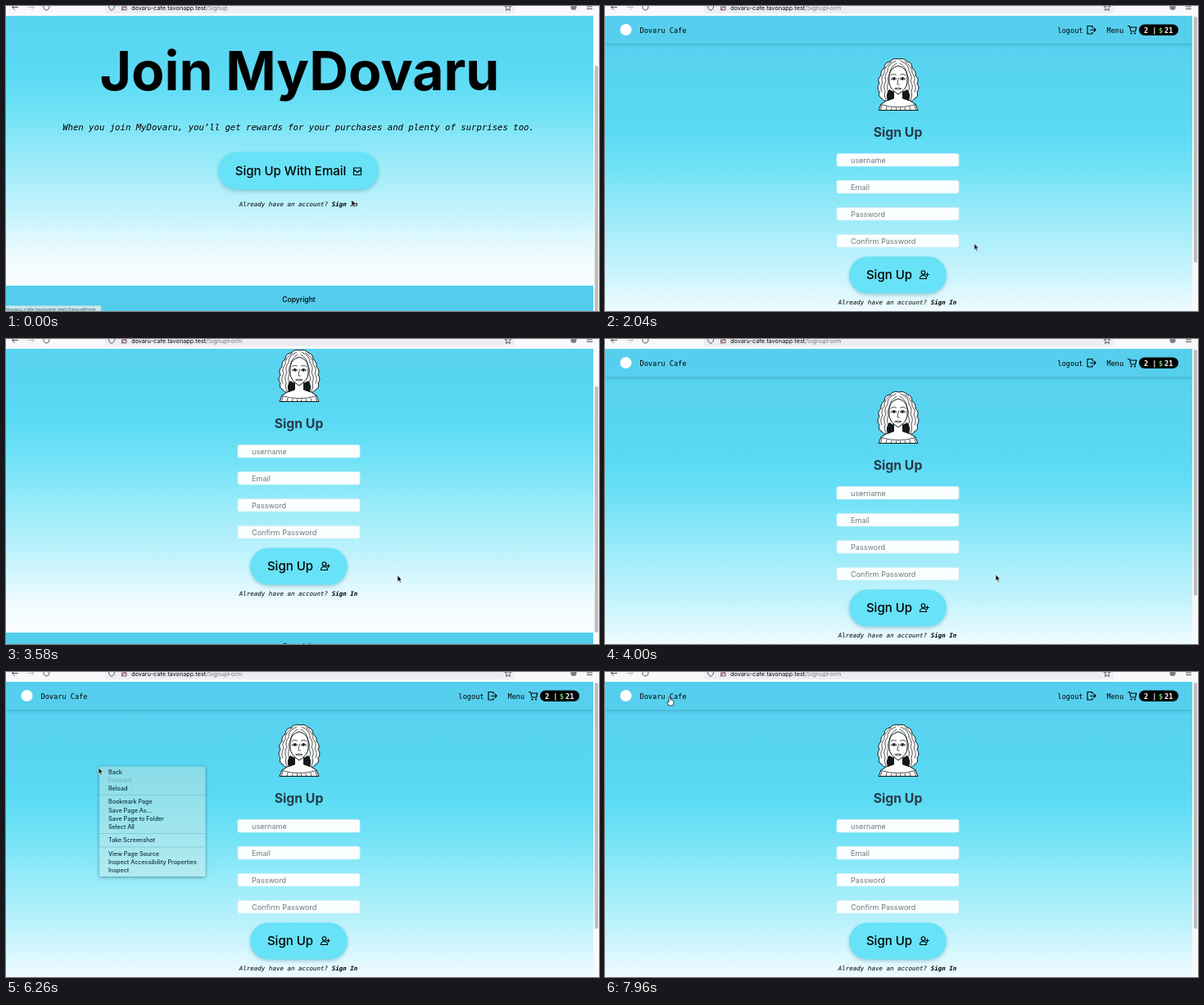
Animation, 724 px wide and 373 px high, one loop 8 s. Source, as an HTML page:

```html
<!DOCTYPE html>
<html lang="en">
<head>
<meta charset="utf-8">
<title>Sign up</title>
<style>
  html, body { margin: 0; width: 100%; height: 100%; overflow: hidden; background: #fff; }
  svg.stage { display: block; width: 724px; height: 373px; }
  text { font-family: Inter, Roboto, sans-serif; fill: #000; }
  .mono { font-family: "DejaVu Sans Mono", "Liberation Mono", monospace; font-size: 8.6px; }
  .note { font-size: 7.5px; font-style: italic; }
  .lead { font-size: 10.63px; font-style: italic; }
  .mid { text-anchor: middle; }
  .bold { font-weight: 700; }
  .title { font-size: 66px; font-weight: 750; }
  .heading { font-size: 15.8px; fill: #263c48; }
  .label { font-size: 15px; font-weight: 450; }
  .hint { font-size: 9.1px; fill: #74797d; }
  .url { font-size: 7.3px; }
  .path { fill: #77777d; }
  .menu text { font-size: 7.15px; font-weight: 500; fill: #0d3440; }
  .menu .off { fill: #6fb4c1; }
  .pill text { fill: #fff; }
  .pill .money { fill: #5fd35a; }
  .field { fill: #fafeff; stroke: #d3f0f7; stroke-width: .8; }
  .btn { fill: #68e2f7; filter: drop-shadow(0 2px 2px rgba(20, 100, 120, .3)); }
  .bar { fill: #56cfee; filter: drop-shadow(0 2px 2px rgba(20, 90, 110, .25)); }
  .panel { fill: url(#glass); filter: drop-shadow(0 1px 2px rgba(10, 60, 75, .5)); }
  .icon { fill: none; stroke: #000; stroke-width: 1.1; stroke-linecap: round; stroke-linejoin: round; }
  .chrome { fill: none; stroke: #55555c; stroke-width: 1; stroke-linecap: round; stroke-linejoin: round; }
  .chrome.off { stroke: #b9b9be; }
  .ink { fill: none; stroke: #14181a; stroke-width: .75; stroke-linecap: round; }
  .paper { fill: #fff; stroke: #14181a; stroke-width: 1; stroke-linejoin: round; }

  .page, .thumb, .cursor, .before, .after, .menu, .arrow, .hand {
    animation: 8s step-end infinite;
  }
  .page { animation-name: scroll; }
  .thumb { animation-name: thumb; }
  .cursor { animation-name: move; }
  .before { animation-name: before; }
  .after { animation-name: after; }
  .menu { animation-name: menu; }
  .arrow { animation-name: arrow; }
  .hand { animation-name: hand; }

  @keyframes scroll {
    0% { transform: translateY(-68px); }
    18.75% { transform: translateY(-46px); }
    20.4% { transform: translateY(-16px); }
    22.1% { transform: translateY(0); }
    43.25% { transform: translateY(-20px); }
    44.75% { transform: translateY(-51px); }
    46.25% { transform: translateY(-68px); }
    48% { transform: translateY(-30px); }
    50%, 100% { transform: translateY(0); }
  }
  @keyframes thumb {
    0% { transform: translateY(60px); }
    18.75% { transform: translateY(40px); }
    20.4% { transform: translateY(14px); }
    22.1% { transform: translateY(0); }
    43.25% { transform: translateY(17px); }
    44.75% { transform: translateY(45px); }
    46.25% { transform: translateY(60px); }
    48% { transform: translateY(26px); }
    50%, 100% { transform: translateY(0); }
  }
  @keyframes move {
    0% { transform: translate(422px, 237px); }
    3.5% { transform: translate(422px, 237px); animation-timing-function: steps(8); }
    16.8% { transform: translate(445px, 294px); }
    20.4% { transform: translate(445px, 294px); animation-timing-function: steps(8); }
    34.6% { transform: translate(468px, 280px); animation-timing-function: steps(6); }
    44.7% { transform: translate(478px, 289px); }
    50% { transform: translate(477px, 288px); }
    56.8% { transform: translate(477px, 288px); animation-timing-function: steps(8); }
    70% { transform: translate(113px, 117px); }
    85.2% { transform: translate(113px, 117px); animation-timing-function: steps(6); }
    96% { transform: translate(74px, 32px); }
    97.6%, 100% { transform: translate(79px, 30px); }
  }
  @keyframes before { 0% { visibility: visible; } 3.5%, 100% { visibility: hidden; } }
  @keyframes after { 0% { visibility: hidden; } 3.5%, 100% { visibility: visible; } }
  @keyframes menu { 0% { visibility: hidden; } 76.5% { visibility: visible; } 83.5%, 100% { visibility: hidden; } }
  @keyframes arrow { 0% { visibility: visible; } 97.6%, 100% { visibility: hidden; } }
  @keyframes hand { 0% { visibility: hidden; } 97.6%, 100% { visibility: visible; } }
</style>
</head>
<body>
<svg class="stage" viewBox="0 0 724 373">
  <defs>
    <linearGradient id="sky" gradientUnits="userSpaceOnUse" x1="0" y1="12" x2="0" y2="410">
      <stop offset="0" stop-color="#56cfee"/>
      <stop offset=".22" stop-color="#58d5f1"/>
      <stop offset=".35" stop-color="#5bdaf4"/>
      <stop offset=".45" stop-color="#6ce1f6"/>
      <stop offset=".6" stop-color="#96eaf9"/>
      <stop offset=".75" stop-color="#bdf2fc"/>
      <stop offset=".91" stop-color="#effbff"/>
      <stop offset="1" stop-color="#fbfdff"/>
    </linearGradient>
    <linearGradient id="glass" x1="0" y1="0" x2="0" y2="1">
      <stop offset="0" stop-color="#8adbe8"/>
      <stop offset=".4" stop-color="#98e2ec"/>
      <stop offset="1" stop-color="#b4ebf2"/>
    </linearGradient>
    <g id="half">
      <path d="M15 38Q10 44 13 52L20 49L20.500 41Z" fill="#14181a"/>
      <path class="ink" d="M23 3Q12 8 13 16Q8 22 11 28Q7 34 10 40Q8 46 11 51M18 4Q8 11 9 18Q4 24 7 29Q3 36 6 41M24 6Q16 11 16 18Q12 24 14 30Q11 36 14 41"/>
      <path class="ink" d="M17 20.500Q20 17.800 23.500 20" stroke-width="1.200"/>
      <path class="ink" d="M17.500 25.200Q20.500 21.500 24 25.200Q20.800 27.600 17.500 25.200"/>
      <circle cx="20.800" cy="24.700" r="1.500" fill="#14181a"/>
      <path class="ink" d="M6 58L4.500 63M12 59.500L11 63M18 60.500L17.500 63M23.500 61V63"/>
    </g>
  </defs>

  <g class="page">
    <rect y="12" width="717" height="400" fill="url(#sky)"/>

    <rect class="bar" y="10" width="717" height="36"/>
    <circle cx="25.500" cy="29" r="7" fill="#fff"/>
    <text class="mono" x="42.500" y="32.500">Dovaru Cafe</text>
    <text class="mono" x="552.500" y="32.500">logout</text>
    <path class="icon" d="M595 26.500V24.500H589V34H595V32M592.500 29.200H599M597 27L599.200 29.200L597 31.400"/>
    <text class="mono" x="612.500" y="32.500">Menu</text>
    <path class="icon" d="M638.500 24.500H640.500L642 31H647.500L648.800 26H641"/>
    <circle cx="642.500" cy="33.500" r="1.100"/>
    <circle cx="647" cy="33.500" r="1.100"/>
    <g class="pill bold">
      <rect x="652" y="22.500" width="48" height="13.500" rx="6.700"/>
      <text class="mono" x="658" y="32.500">2 |</text>
      <text class="mono money" x="676" y="32.500">$</text>
      <text class="mono" x="683" y="32.500">21</text>
    </g>

    <g class="before">
      <text class="title mid" x="358.500" y="171">Join MyDovaru</text>
      <text class="mono lead mid" x="357" y="220.300">When you join MyDovaru, you’ll get rewards for your purchases and plenty of surprises too.</text>
      <rect class="btn" x="259" y="246.500" width="196" height="46" rx="23"/>
      <text class="label mid" x="347.500" y="275.300">Sign Up With Email</text>
      <path class="icon" d="M424.500 266H433.500V274.500H424.500ZM424.500 268L429 271.500L433.500 268"/>
      <text class="mono note mid" x="357" y="312.600">Already have an account? <tspan class="bold">Sign In</tspan></text>
    </g>

    <g class="after">
      <g transform="translate(332 64)">
        <path class="paper" d="M27 1Q20 -1 16 4Q9 5 9 12Q4 15 5 21Q0 25 3 31Q-1 36 3 41Q1 47 6 49Q8 53 13 52H39Q44 53 46 49Q51 47 49 41Q53 36 49 31Q52 25 47 21Q48 15 43 12Q43 5 37 4Q33 -1 27 1Z"/>
        <path class="paper" d="M20.500 39V49Q11 51 5 56L2 63.500H50L47 56Q41 51 31.500 49V39"/>
        <path class="paper" d="M15 20Q16 12 26 9Q36 12 37 20V30Q36 38 26 44Q16 38 15 30Z"/>
        <path class="ink" d="M26.500 24L24.800 31.500Q26 32.700 27.500 32M22 37Q26 35 30 37Q26 39.500 22 37M5 56.500Q26 63 47 56.500"/>
        <use href="#half"/>
        <use href="#half" transform="translate(52) scale(-1 1)"/>
      </g>
      <text class="heading bold mid" x="357.500" y="159.500">Sign Up</text>
      <rect class="field" x="283" y="180.500" width="149" height="15.500" rx="2"/>
      <text class="hint" x="300" y="191.500">username</text>
      <rect class="field" x="283" y="213.500" width="149" height="15.500" rx="2"/>
      <text class="hint" x="300" y="224.500">Email</text>
      <rect class="field" x="283" y="246.500" width="149" height="15.500" rx="2"/>
      <text class="hint" x="300" y="257.500">Password</text>
      <rect class="field" x="283" y="279.500" width="149" height="15.500" rx="2"/>
      <text class="hint" x="300" y="290.500">Confirm Password</text>
      <rect class="btn" x="298" y="306.500" width="119" height="45" rx="22.500"/>
      <text class="label mid" x="347" y="334.300">Sign Up</text>
      <path class="icon" d="M384.500 333.500Q384.500 329.500 388.500 329.500Q392.500 329.500 392.500 333.500ZM393.500 326.500V330.500M391.500 328.500H395.500"/>
      <circle class="icon" cx="388.500" cy="326" r="2.300"/>
      <text class="mono note mid" x="357" y="364.600">Already have an account? <tspan class="bold">Sign In</tspan></text>
    </g>

    <rect y="410" width="717" height="34" fill="#54cdec"/>
    <text class="mid" x="357.500" y="430.200" font-size="8.600" font-weight="500">Copyright</text>
  </g>

  <g class="before">
    <rect y="366.500" width="116" height="8" fill="#c8e6ec"/>
    <text x="0" y="373.800" font-size="5.900" style="fill:#35616b">dovaru-cafe.tavonapp.test/SignupForm</text>
  </g>

  <rect x="717" y="12" width="7" height="361" fill="#fafafa"/>
  <rect class="thumb" x="718.800" y="13" width="4.200" height="301" rx="2.100" fill="#bdbdbf"/>

  <rect width="724" height="12" fill="#f9f9fb"/>
  <rect x="121" y="-10" width="500" height="19" rx="2" fill="#eeeef2"/>
  <path class="chrome" d="M14.500 1.500H7.500M10.500 -1.500L7.500 1.500L10.500 4.500M52 -1A3.600 3.600 0 1 1 46 0M125.500 -2V1Q126 4 129 5.500Q132 4 132.500 1V-2M142 1H147V4.800H142ZM709.500 1H715.500M709.500 3.500H715.500"/>
  <path d="M140.800 5.500L148 -1.500" stroke="#d7304c"/>
  <path class="chrome off" d="M27 1.500H34M31 -1.500L34 1.500L31 4.500"/>
  <path class="chrome" d="M609 0H617L614.800 2.300L615.500 5.500L613 4L610.500 5.500L611.200 2.300Z"/>
  <circle cx="693" cy="1.500" r="3.600" fill="#7d7d84"/>
  <text class="url before" x="153" y="4.600">dovaru-cafe.tavonapp.test<tspan class="path">/Signup</tspan></text>
  <text class="url after" x="153" y="4.600">dovaru-cafe.tavonapp.test<tspan class="path">/SignupForm</tspan></text>

  <g class="menu">
    <rect class="panel" x="114" y="115.500" width="129.500" height="134.500" rx="2"/>
    <path d="M114 150.500H243.500M114 197.500H243.500M114 214H243.500" stroke="#7cc6d4" stroke-width=".8"/>
    <text x="125" y="124.600">Back</text>
    <text class="off" x="125" y="134.700">Forward</text>
    <text x="125" y="144.800">Reload</text>
    <text x="125" y="161.400">Bookmark Page</text>
    <text x="125" y="171.500">Save Page As...</text>
    <text x="125" y="181.600">Save Page to Folder</text>
    <text x="125" y="191.700">Select All</text>
    <text x="125" y="208.400">Take Screenshot</text>
    <text x="125" y="224.600">View Page Source</text>
    <text x="125" y="234.800">Inspect Accessibility Properties</text>
    <text x="125" y="245">Inspect</text>
  </g>

  <g class="cursor" stroke-linejoin="round">
    <path class="arrow" d="M0 0V7.800L1.800 6.200L3.100 9.200L4.400 8.600L3.100 5.700H5.500Z" fill="#0b0d0e" stroke="#fff" stroke-width=".6"/>
    <path class="hand" d="M-1 1Q0 -.5 1 1V4Q2.200 3.300 2.600 4.400Q3.600 4 4 5Q5 5 5 6.500Q5 9 3.800 11H-1.200Q-2 9 -3.600 7Q-3.300 5.500 -1 7Z" fill="#fff" stroke="#14181a" stroke-width=".8"/>
  </g>
</svg>
</body>
</html>
```
